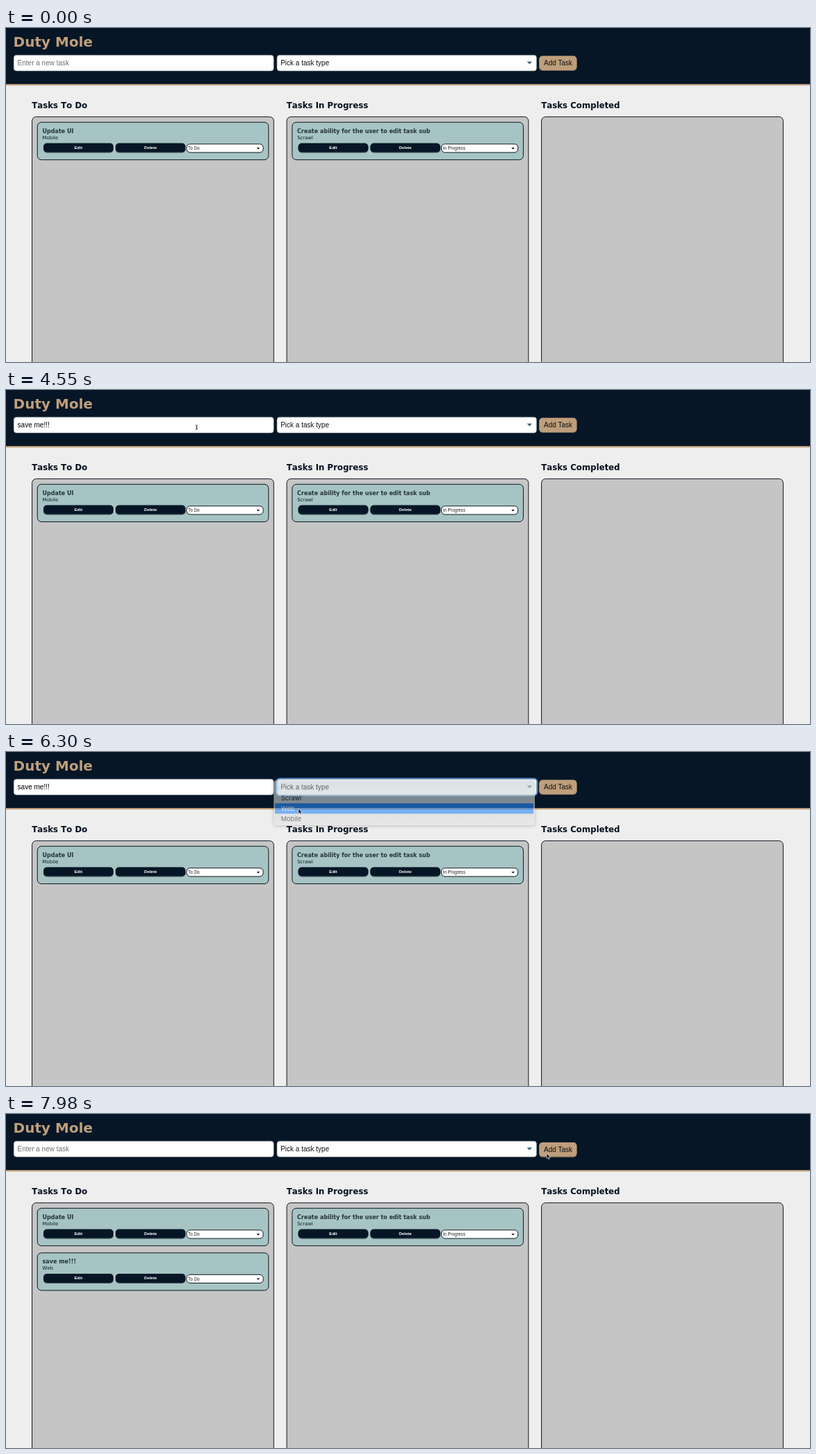
Recreate the animation shown at these times as an HTML page. Size 1160x483 px, loop 8000 ms.

```html
<!DOCTYPE html>
<html lang="en">
<head>
<meta charset="utf-8">
<title>Task board</title>
<style>
html, body { margin: 0; width: 100%; height: 100%; overflow: hidden; background: #eee; }
svg { display: block; width: 1160px; height: 483px; }
text { white-space: pre; }
.v { font-family: "DejaVu Sans", Verdana, sans-serif; font-kerning: none; }
.a { font-family: "Liberation Sans", Arial, sans-serif; }
.m { font-family: Inter, sans-serif; }
.title { font-size: 20px; font-weight: 700; fill: #bf9f7b; }
.head { font-size: 11.8px; font-weight: 700; fill: #06101f; }
.name { font-size: 8.05px; font-weight: 700; fill: #25333a; }
.type { font-size: 6.9px; fill: #0c1a24; }
.btn { font-size: 6.1px; font-weight: 700; fill: #fff; text-anchor: middle; }
.sel { font-size: 6.3px; fill: #222; }
.field { font-size: 10px; fill: #111; }
.hint { font-size: 5.85px; fill: #111; }
.item { font-size: 9.2px; fill: #1c2226; }
#menuBox { filter: drop-shadow(0 1px 2.5px rgba(0, 0, 0, .35)); }
#hints path { filter: drop-shadow(0 .5px 1px rgba(0, 0, 0, .4)); }
</style>
</head>
<body>
<svg id="stage" viewBox="0 0 1160 483"></svg>
<script>
const LOOP = 8000, STEP = 70;

const rect = (x, y, w, h, r, fill, extra = '') =>
  `<rect x="${x}" y="${y}" width="${w}" height="${h}" rx="${r}" fill="${fill}" ${extra}/>`;
const text = (x, y, cls, s, extra = '') =>
  `<text x="${x}" y="${y}" class="${cls}" ${extra}>${s}</text>`;
const group = (id, inner) => `<g id="${id}">${inner}</g>`;
const LINE = 'stroke="#0b1620" stroke-width="1"';

function button(x, label) {
  return rect(x, 167.2, 101, 13.2, 5, '#3a4650') + rect(x, 166.5, 101, 12.8, 5, '#061626') +
    text(x + 50.5, 174.8, 'a btn', label);
}

function card(dx, dy, name, type, state) {
  return `<g transform="translate(${dx} ${dy})">` +
    rect(45.3, 136.3, 333.5, 54.3, 6, '#a6c4c4', LINE) +
    text(52.5, 151.7, 'v name', name) + text(52.6, 160.6, 'v type', type) +
    button(54, 'Edit') + button(158, 'Delete') +
    rect(260.7, 167.8, 110.4, 12.2, 5, '#fff', LINE) +
    text(262.8, 176.2, 'a sel', state) +
    '<path d="M361.6 172.9h4.6l-2.3 2.5z" fill="#111"/></g>';
}

function column(i, title) {
  const x = 37.6 + 367.5 * i;
  return text(x - .4, 116.2, 'v head', title) + rect(x, 128.4, 348.7, 380, 6, '#c5c5c5', LINE);
}

function field(x, w) {
  return rect(x, 39.2, w, 22.9, 4, '#fff', 'stroke="#8b9197" stroke-width=".6"');
}

const items = ['Pick a task type', 'Scrawl', 'Web', 'Mobile'];
const hints = ['read a book', 'asdasdasd', 'asdasdas', 'hi', 'test', 'dxcvxc'];

const stage = document.getElementById('stage');
stage.innerHTML =
  `<defs><linearGradient id="glass" x1="0" y1="0" x2="0" y2="1">
    <stop offset="0" stop-color="#c3cfd4"/><stop offset=".55" stop-color="#d6dadb"/>
    <stop offset="1" stop-color="#e3e3e4"/></linearGradient></defs>` +
  rect(0, 0, 1160, 483, 0, '#eee') +
  rect(0, 0, 1160, 81.2, 0, '#061626') + rect(0, 81, 1160, 2.2, 0, '#bf9f7b') +
  text(10.6, 27, 'v title', 'Duty Mole') +
  field(11.2, 375) + text(16.6, 53.8, 'a field', '', 'id="entry"') +
  rect(16.6, 45, .9, 11.3, 0, '#111', 'id="caret"') +
  rect(390, 38.4, 376.4, 24.4, 5, 'none', 'id="focus" stroke="#4a90e0" stroke-width="2"') +
  field(391, 374.5) + text(396.2, 54, 'a field', '', 'id="pick"') +
  '<path d="M751.5 48.4h7.6l-3.8 4z" fill="#48677f"/>' +
  group('add', rect(769.3, 41.2, 54.3, 20.8, 5, '#6d6258') + rect(769.2, 40.3, 54.3, 20.6, 5, '#be9e7b') +
    text(776, 54, 'a field', 'Add Task')) +
  ['Tasks To Do', 'Tasks In Progress', 'Tasks Completed'].map((s, i) => column(i, s)).join('') +
  card(0, 0, 'Update UI', 'Mobile', 'To Do') +
  card(367.6, 0, 'Create ability for the user to edit task sub', 'Scrawl', 'In Progress') +
  group('fresh', card(0, 64.5, 'save me!!!', 'Web', 'To Do')) +
  group('hints', '<path d="M57 67h4l4-4.4 4 4.4h33.4q2 0 2 2v97.4q0 2-2 2H57q-2 0-2-2V69q0-2 2-2z" fill="#fff"/>' +
    hints.map((s, i) => text(60.6, 79.1 + 16.33 * i, 'm hint', s)).join('')) +
  group('menu', rect(386.3, 41, 376.7, 65, 4, 'url(#glass)', 'id="menuBox"') +
    rect(388, 0, 373, 15, 1, '#2a86f7', 'id="bar"') +
    '<path d="M390.6 52.2l1.2 1.5 2.4-3.8" fill="none" stroke="#8d979c" stroke-width=".9"/>' +
    items.map((s, i) => text(396.8, 55.3 + 15 * i, 'm item', s)).join('')) +
  '<circle id="ring" fill="none" stroke="#0a0a0a" stroke-width="1.6"/>' +
  group('arrow', '<path d="M0 0v7.4l1.7-1.6 1.2 2.7 1.2-.5-1.2-2.6h2.4z" fill="#080808" stroke="#fff" stroke-width=".6"/>') +
  group('beam', '<path d="M-1.6-3.2q1.6 0 1.6.9v4.6q0 .9-1.6.9M1.6-3.2q-1.6 0-1.6.9v4.6q0 .9 1.6.9" fill="none" stroke="#222" stroke-width=".8"/>');

const el = id => document.getElementById(id);
const show = (id, on) => el(id).setAttribute('visibility', on ? 'visible' : 'hidden');
const within = (t, a, b) => t >= a && t < b;
const itemTexts = [...document.querySelectorAll('.item')];
itemTexts[0].style.fill = '#8d979c';

// pointer stops: time, x, y, downward bow on the way there
const stops = [
  [70, 654, 391], [840, 207, 62], [910, 207, 61], [980, 207, 61], [1050, 207.3, 56.5],
  [1540, 207, 56], [1680, 207, 54.5], [4340, 207, 54.5], [4900, 422, 53], [5180, 422, 53],
  [5600, 422, 82], [6790, 422, 82], [7630, 782.5, 54.5, 40], [7910, 782.5, 54.5], [7980, 780, 57]
];
// typing: time, letters entered
const typed = [[2520, 1], [2800, 3], [2940, 4], [3010, 5], [3220, 6], [3290, 7], [3640, 8], [3850, 9], [4060, 10]];
// click rings: start, end, radius
const clicks = [[1050, 1330, 9.6], [1820, 1890, 6.9], [4970, 5040, 9], [6020, 6160, 9], [7700, 7840, 9]];

function pointer(t) {
  const i = stops.findIndex(s => s[0] > t);
  if (i < 0) return stops[stops.length - 1].slice(1);
  if (i === 0) return stops[0].slice(1);
  const [t0, x0, y0] = stops[i - 1], [t1, x1, y1, bow = 0] = stops[i];
  const u = (t - t0) / (t1 - t0), k = u * u * (3 - 2 * u);
  return [x0 + (x1 - x0) * k, y0 + (y1 - y0) * k + bow * Math.sin(Math.PI * k)];
}

function render(t) {
  const [x, y] = pointer(t);
  const seen = t >= 70 && !within(t, 2520, 4410);
  const beam = t >= 1610 && t < 4900 && x < 387;
  show('arrow', seen && !beam);
  show('beam', seen && beam);
  for (const id of ['arrow', 'beam']) el(id).setAttribute('transform', `translate(${x} ${y})`);

  const click = clicks.find(c => within(t, c[0], c[1]));
  show('ring', click);
  if (click) {
    const ring = el('ring');
    ring.setAttribute('cx', x);
    ring.setAttribute('cy', y);
    ring.setAttribute('r', click[2]);
  }

  const done = t >= 7840;
  const count = done ? 0 : typed.reduce((n, s) => t >= s[0] ? s[1] : n, 0);
  const entry = el('entry');
  entry.textContent = count ? 'save me!!!'.slice(0, count) : 'Enter a new task';
  entry.style.fill = count ? '#000' : '#707070';
  el('caret').setAttribute('x', 16.5 + (count ? entry.getComputedTextLength() : 0));
  show('caret', within(t, 1820, 2310) || within(t, 2520, 4550));
  show('hints', within(t, 1820, 2590));

  el('pick').textContent = items[within(t, 6510, 7840) ? 2 : 0];
  show('focus', within(t, 4970, 7700));
  const open = within(t, 4970, 6510);
  show('menu', open);
  el('menu').setAttribute('opacity', Math.min(1, (6500 - t) / 340));
  const row = Math.floor((y - 44.3) / 15);
  const lit = open && row > 0 && !within(t, 6090, 6160);
  show('bar', lit);
  el('bar').setAttribute('y', 44.3 + 15 * row);
  itemTexts.forEach((n, i) => { if (i) n.style.fill = lit && i === row ? '#fff' : '#1c2226'; });

  el('add').setAttribute('transform', `translate(0 ${t >= 7560 ? .7 : 0})`);
  show('fresh', done);
}

const start = performance.now();
function tick() {
  const t = (performance.now() - start) % LOOP;
  render(Math.floor(t / STEP) * STEP);
  requestAnimationFrame(tick);
}
tick();
</script>
</body>
</html>
```
